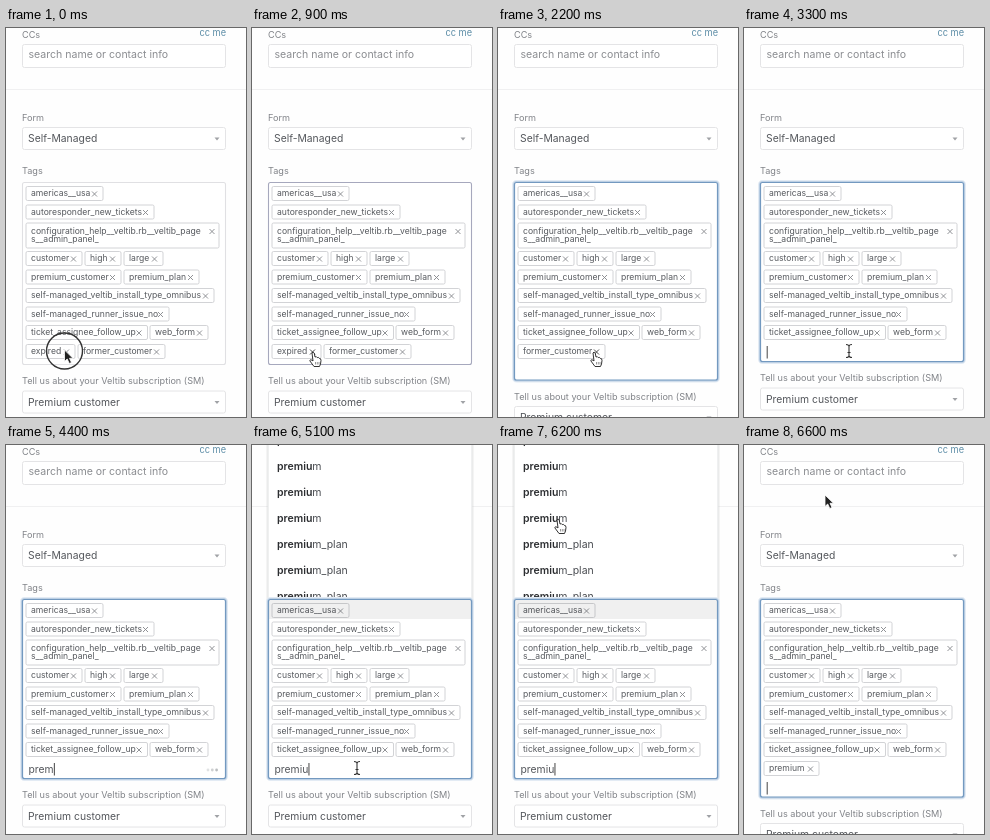
Recreate the animation shown at these times as an HTML page. Size 240 by 389 pixels, loop 6.7 s.

```html
<!DOCTYPE html>
<html lang="en">
<head>
<meta charset="utf-8">
<title>Editing ticket tags</title>
<style>
  html, body { margin: 0; width: 100%; height: 100%; overflow: hidden; background: #fefefe; }
  svg { display: block; width: 240px; height: 389px; }
  text { font-family: Inter, "Open Sans", sans-serif; white-space: pre; }
  .label { font-size: 9.15px; fill: #808388; }
  .link { font-size: 9.2px; fill: #5b8ca6; text-anchor: end; }
  .hint { font-size: 10.55px; fill: #8b8d91; }
  .value { font-size: 10.35px; fill: #54575c; }
  .tag { font-size: 8.6px; fill: #56595e; }
  .item { font-size: 10.5px; fill: #4a4d52; }
  .item tspan { font-weight: 600; fill: #2c2e31; }
  .field { fill: #fff; stroke: #e4e4e6; }
</style>
</head>
<body>
<svg id="stage" viewBox="0 0 240 389"></svg>
<script>
const LOOP = 6700, STEP = 100;
const REMOVE_FIRST = 1300, REMOVE_SECOND = 2400, OPEN = 4900, PICK = 6300;
const KEYS = [3900, 4050, 4200, 4350, 4500, 4700];
const CARET_RESETS = [REMOVE_FIRST, REMOVE_SECOND, 3200, ...KEYS, PICK];

// time, x, y of the pointer's hot spot
const PATH = [
  [0, 58.5, 322], [300, 61, 324], [1500, 61, 324], [2000, 96, 324], [2700, 96, 324],
  [3100, 105, 323], [5200, 105, 323], [5700, 51, 220], [6100, 60, 74], [6300, 60, 74],
  [6600, 81, 50]
];

// left, right, centre line, text
const TAGS = [
  [20, 97, 165.5, 'americas__usa'],
  [20, 148, 184, 'autoresponder_new_tickets'],
  [20, 76, 230.5, 'customer'], [79, 115, 230.5, 'high'], [118, 157, 230.5, 'large'],
  [20, 115, 249, 'premium_customer'], [118, 193, 249, 'premium_plan'],
  [20, 208, 267.5, 'self-managed_veltib_install_type_omnibus'],
  [20, 163, 286, 'self-managed_runner_issue_no'],
  [20, 141.5, 304.5, 'ticket_assignee_follow_up'], [144, 202, 304.5, 'web_form']
];

const stage = document.getElementById('stage');
const pen = document.createElement('canvas').getContext('2d');

const text = (x, y, cls, s) => `<text x="${x}" y="${y}" class="${cls}">${s}</text>`;
const rect = (x, y, w, h, attrs) =>
  `<rect x="${x}" y="${y}" width="${w}" height="${h}" ${attrs}/>`;
const path = (d, attrs) => `<path d="${d}" ${attrs}/>`;

const cross = (x, y, colour = '#85878c') =>
  path(`M${x - 2.5} ${y - 2.5}l5 5m0 -5l-5 5`, `stroke="${colour}" stroke-width=".9"`);
const frame = (x, right, y, h) =>
  rect(x, y, right - x, h, 'rx="1.5" fill="#fff" stroke="#cdced2" stroke-width=".9"');
const tag = ([x, right, y, s], crossColour) =>
  frame(x, right, y - 7, 14) + text(x + 5, y + 2.8, 'tag', s) +
  cross(right - 8.5, y + .5, crossColour);
const select = (y, s) =>
  rect(16.5, y, 203, 22, 'rx="2" class="field"') + text(22, y + 14.8, 'value', s) +
  path(`M208.5 ${y + 10}h5l-2.5 3z`, 'fill="#a0a2a6"');

const page =
  rect(0, 0, 240, 389, 'fill="#fefefe"') +
  text(16, 10, 'label', 'CCs') + text(220, 8, 'link', 'cc me') +
  rect(16.5, 16.5, 203, 23, 'rx="2" class="field"') +
  text(22.5, 30, 'hint', 'search name or contact info') +
  path('M0 61.5H240', 'stroke="#f0f0f1"') +
  text(16, 93, 'label', 'Form') + select(99.5, 'Self-Managed') +
  text(16, 145.5, 'label', 'Tags');

const fixedTags = TAGS.map(t => tag(t)).join('') + frame(20, 213, 195, 25) +
  text(25, 205.5, 'tag', 'configuration_help__veltib.rb__veltib_page') +
  text(25, 213.5, 'tag', 's__admin_panel_') + cross(206, 203.5);

function lastRow(t) {
  const hover = '#333';
  if (t < REMOVE_FIRST)
    return tag([20, 69, 323.5, 'expired'], t < 300 ? undefined : hover) +
      tag([72, 159, 323.5, 'former_customer']);
  if (t < REMOVE_SECOND)
    return tag([20, 107, 323.5, 'former_customer'], t < 2000 ? undefined : hover);
  return t < PICK ? '' : tag([20, 75, 323.5, 'premium']);
}

function tagBox(t, bottom) {
  const focused = t >= REMOVE_FIRST;
  const outline = (colour, width) => rect(16.5, 154.5, 203, bottom - 154.5,
    `rx="2" fill="#fff" stroke="${colour}" stroke-width="${width}"`);
  if (focused) return outline('#e3ebf4', 5) + outline('#bdd0e4', 3) + outline('#7399c0', 1.2);
  return outline(t < 300 ? '#e0e0e3' : '#a6a8bd', 1.1);
}

function input(t, y) {
  if (t < REMOVE_FIRST) return '';
  const typed = t < PICK ? 'premiu'.slice(0, KEYS.filter(k => k <= t).length) : '';
  pen.font = '10.35px Inter, "Open Sans", sans-serif';
  const x = 23.2 + pen.measureText(typed).width;
  const since = t - Math.max(...CARET_RESETS.filter(k => k <= t));
  let out = text(22.5, y + 4, 'value', typed);
  if (since % 1060 < 530) out += path(`M${x} ${y - 6}v12.5`, 'stroke="#444"');
  if (t >= 4200 && t < OPEN)
    for (let i = 0; i < 3; i++) {
      const shade = .55 + .25 * Math.sin(t / 150 - i);
      out += `<circle cx="${202 + i * 4.3}" cy="325" r="1.4" fill="#a3a7aa" opacity="${shade}"/>`;
    }
  return out;
}

function dropdown() {
  let out = rect(14, -4, 208, 160, 'fill="#000" opacity=".04"') +
    rect(16, -1, 204, 156, 'fill="#fff" stroke="#dfe1e2"');
  for (let i = -1; i < 6; i++)
    out += text(25, 25 + i * 25.9, 'item', `<tspan>premiu</tspan>m${i > 2 ? '_plan' : ''}`);
  return out;
}

function pointer(t) {
  if (t >= KEYS[0] && t < 5100) return '';
  let i = 0;
  while (i < PATH.length - 2 && PATH[i + 1][0] <= t) i++;
  const [a, b] = [PATH[i], PATH[i + 1]];
  const p = Math.min(1, (t - a[0]) / (b[0] - a[0]));
  const ease = p * p * (3 - 2 * p);
  const x = a[1] + (b[1] - a[1]) * ease, y = a[2] + (b[2] - a[2]) * ease;
  let shape;
  if (t < 300 || t >= PICK)
    shape = path('M0 0V11.5L2.7 9L4.8 13.5L7 12.5L5 8.3H8.5Z', 'fill="#222" stroke="#fff" stroke-width=".8"');
  else if (t >= REMOVE_SECOND && t < 5500)
    shape = path('M-3 -6.5Q0 -6.5 0 -4.5Q0 -6.5 3 -6.5M0 -5V5M-3 6.5Q0 6.5 0 4.5Q0 6.5 3 6.5M-1.5 1.5h3',
      'fill="none" stroke="#333" stroke-width="1.1"');
  else
    shape = path('M-1 1Q0 -1 1.2 1L2 5Q3.5 4 4.2 5.6Q5.7 4.8 6.3 6.4Q8 6 8 8.5L7.5 12L6.5 14.5H1L-3.2 8.8Q-3 7 -1 8.2L0 9Z',
      'fill="#fff" stroke="#333" stroke-width="1" stroke-linejoin="round"') +
      path('M2.5 10v2.5M4.3 10v2.5M6 10v2.5', 'stroke="#555" stroke-width=".6"');
  const ring = t < 300
    ? `<circle r="18" cy="1" fill="none" stroke="#333" stroke-width="1.4" opacity="${1 - t / 300}"/>` : '';
  return `<g transform="translate(${x} ${y})">${ring}${shape}</g>`;
}

function draw(t) {
  const extraRow = (t >= REMOVE_FIRST && t < REMOVE_SECOND) || t >= PICK;
  const bottom = extraRow ? 352 : t < REMOVE_FIRST ? 336.5 : 333.5;
  const open = t >= OPEN && t < PICK;
  stage.innerHTML = page +
    text(16, bottom + 19.5, 'label', 'Tell us about your Veltib subscription (SM)') +
    select(bottom + 26.5, 'Premium customer') +
    (open ? dropdown() : '') + tagBox(t, bottom) + fixedTags + lastRow(t) +
    input(t, extraRow ? 343 : 324) +
    (open ? rect(17, 155, 202, 19, 'fill="#000" opacity=".06"') : '') +
    pointer(t);
}

const start = performance.now();
let shown = -1;
function tick() {
  const t = Math.floor((performance.now() - start) % LOOP / STEP) * STEP;
  if (t !== shown) draw(shown = t);
  requestAnimationFrame(tick);
}
tick();
</script>
</body>
</html>
```
